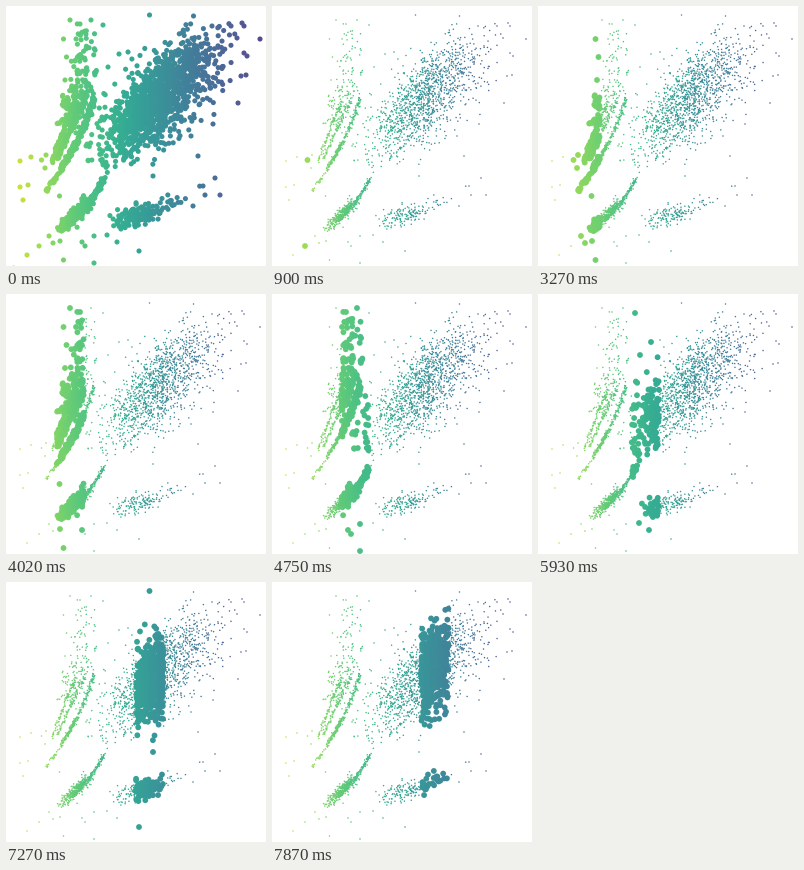
A matplotlib script that plays this animation: 260 by 260 pixels, repeating every 8000 ms.

```python
import numpy as np
import matplotlib.pyplot as plt
from matplotlib.animation import FuncAnimation

SIZE, DPI = 260, 100
LOOP, INTERVAL = 8000, 20
FULL, BIG, SMALL = 5.1, 5.8, 1.5  # dot diameters in pixels
BRUSH = 27.2

rng = np.random.default_rng(7)


def cloud(n, cx, cy, sx, slope, sy):
    """Gaussian cloud sheared along a sloped axis."""
    dx = rng.normal(0, sx, n)
    return np.column_stack([cx + dx, cy + slope * dx + rng.normal(0, sy, n)])


def streak(n, a, b, c, jitter, lo=0.0):
    """Points jittered along a quadratic curve."""
    u = rng.uniform(lo, 1, n)[:, None]
    a, b, c = map(np.array, (a, b, c))
    path = (1 - u) ** 2 * a + 2 * u * (1 - u) * b + u ** 2 * c
    return path + rng.normal(0, jitter, (n, 2))


def box(n, x0, x1, y0, y1):
    return np.column_stack([rng.uniform(x0, x1, n), rng.uniform(y0, y1, n)])


def inside(p, x0, x1, y0, y1):
    x, y = p.T
    return p[(x > x0) & (x < x1) & (y > y0) & (y < y1)]


outliers = np.array([
    (14, 155), (25, 151), (17, 194), (14, 181), (22, 179), (35.5, 154),
    (33, 240), (21, 249), (7.5, 262), (57.5, 33), (60.5, 51), (59, 74),
    (64, 14), (74, 18), (85, 14), (97, 19), (143.5, 9), (187.5, 10),
    (236, 17), (238, 20), (206, 20), (225, 20), (254, 33), (231, 32),
    (238, 47), (241, 50), (235, 70), (240, 69), (232, 97), (207, 118),
    (133, 245), (88, 257), (57.5, 254), (79, 240), (53.5, 190), (209, 172),
    (214, 189), (197, 180), (199, 189), (187, 200), (122, 46), (113, 48),
    (102, 61), (192, 150), (185, 130), (147, 170), (40, 149), (39, 162),
    (47, 237), (43, 230), (54, 235), (76, 236), (88, 230), (101, 229),
    (111, 236),
], float)

main = inside(cloud(1120, 158, 87, 29, -0.76, 21), 90, 229, 17, 171)
lanes = [streak(35, (106 + 4 * k, 126 + 9 * k), (124 + 5 * k, 102 + 9 * k),
                (146 + 6 * k, 78 + 8 * k), 0.8) for k in range(4)]
left = [
    streak(75, (46, 156), (56, 128), (70, 95), 0.8),
    streak(85, (52, 152), (64, 124), (79, 95), 0.8),
    streak(75, (40, 185), (60, 160), (70, 135), 0.8),
    streak(190, (56, 160), (75, 135), (88, 93), 1.0),
    inside(cloud(110, 68, 99, 8, -0.9, 13), 45, 93, 66, 133),
]
upper = [box(42, 70, 91, 16, 88), box(22, 63, 84, 52, 90),
         box(14, 80, 98, 126, 160)]
lower = [
    inside(cloud(330, 71, 207.5, 7.5, -0.9, 3.4), 46, 93, 183, 229),
    streak(125, (74, 204), (93, 188), (98, 171), 0.9),
    inside(cloud(135, 133, 209, 11.5, -0.28, 5), 98, 166, 195, 224),
    cloud(20, 168, 195, 12, -0.42, 5),
]

pts = np.vstack([main, *lanes, *left, *upper, *lower, outliers])
pts = pts[np.argsort(pts[:, 0])]
x = pts[:, 0]
colors = plt.get_cmap("viridis")(0.947 - 0.00313 * x)
colors[:, :3] = 0.9 * colors[:, :3] + 0.1

# Left edge of the brush while it is dragged, by step
STEPS = [0, 7, 10, 15, 18, 23, 27, 30, 31]
EDGES = [34.5, 57, 69.5, 89, 93.8, 112, 130, 146, 149.3]


def brush(t):
    """Brushed x range: none, then drawn open, held and dragged."""
    if t < 900:
        return None
    if t < 3270:
        k = min((t - 900) // 146, 7)
        return 30, 36.5 + 3 * k
    left_edge = np.interp((t - 3270) // 148, STEPS, EDGES)
    return left_edge, left_edge + BRUSH


def area(d):
    return (d * 72 / DPI) ** 2


fig = plt.figure(figsize=(SIZE / DPI, SIZE / DPI), dpi=DPI, facecolor="white")
ax = fig.add_axes([0, 0, 1, 1])
ax.set(xlim=(0, SIZE), ylim=(SIZE, 0))
ax.axis("off")
dots = ax.scatter(x, pts[:, 1], s=area(FULL), c=colors, linewidths=0)


def draw(i):
    span = brush(i * INTERVAL + INTERVAL - 1)
    if span is None:
        sizes = np.full(len(x), FULL)
    else:
        sizes = np.where((x >= span[0]) & (x <= span[1]), BIG, SMALL)
    dots.set_sizes(area(sizes), DPI)
    return dots,


anim = FuncAnimation(fig, draw, frames=LOOP // INTERVAL, interval=INTERVAL,
                     repeat=True, repeat_delay=0)
plt.show()
```
